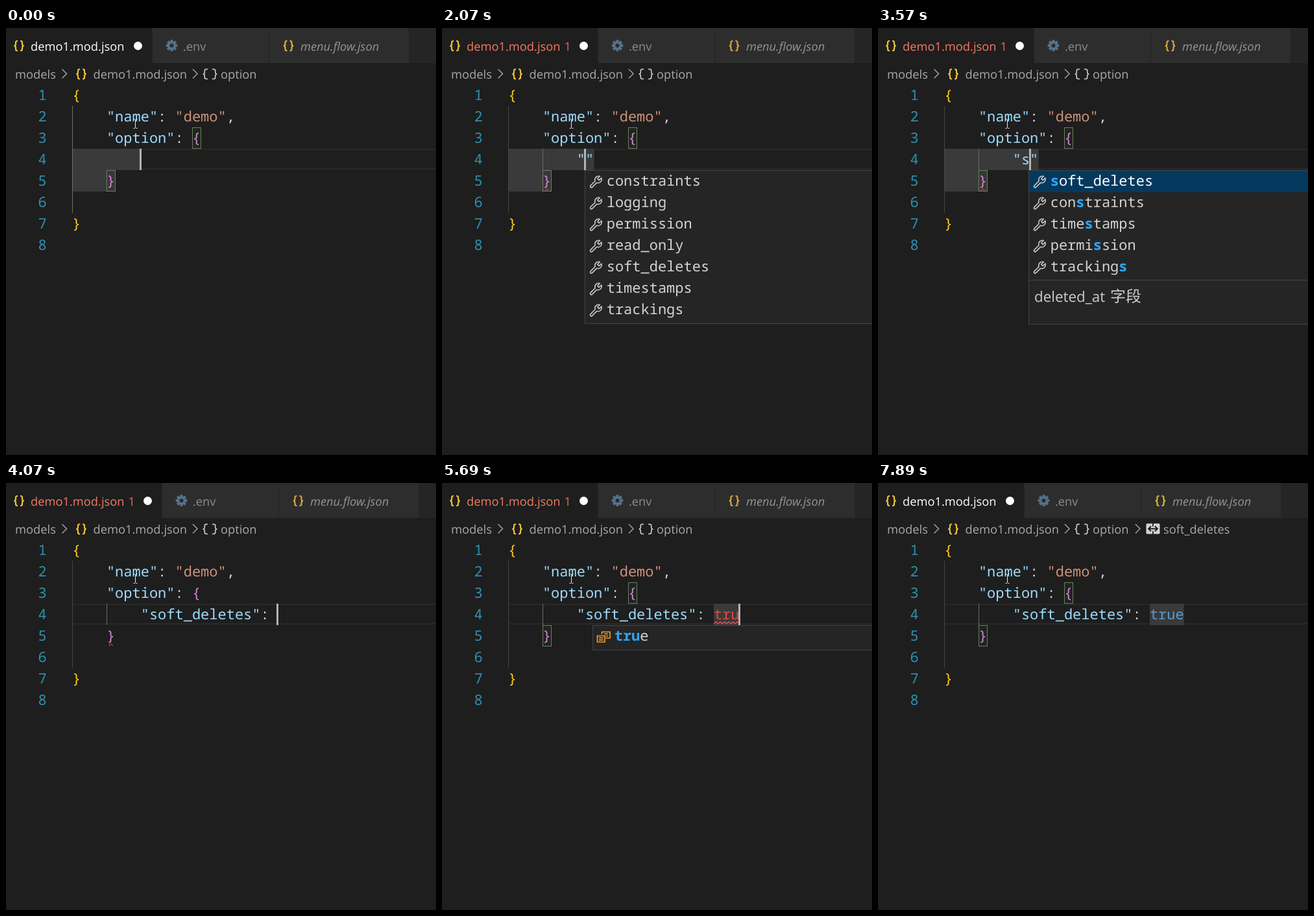
Write an HTML page that moves like this. It is 663 px wide and 658 px high and loops after 8000 ms.

```html
<!DOCTYPE html>
<html lang="en">
<head>
<meta charset="utf-8">
<title>Editor completion</title>
<style>
html, body { margin: 0; width: 100%; height: 100%; overflow: hidden; background: #1e1e1e; }
svg { display: block; width: 663px; height: 658px; }
text { white-space: pre; text-rendering: geometricPrecision; }
.code { font: 500 22px "Noto Sans Mono", monospace; }
.ui { font: 18.3px "Open Sans", "Noto Sans", sans-serif; }
.preview { font: italic 18.3px "Open Sans", "Noto Sans", sans-serif; }
.doc { font: 22.4px "Open Sans", "Noto Sans", sans-serif; }
.cjk { font: 24px "Noto Sans CJK SC", "Noto Sans CJK", sans-serif; }
</style>
</head>
<body>
<svg id="stage" viewBox="0 0 663 658"></svg>
<script>
const LOOP = 8000, CHAR = 13.2, LINE = 33;
const KEY = '#9cdcfe', STR = '#ce9178', PLAIN = '#d4d4d4', GOLD = '#ffcb12', PINK = '#da80d6';
const BLINKS = [570, 1070, 1570, 2070, 3070, 3570, 4670, 5090, 6090, 6390, 6890, 7390, 7890];
const WORDS = ['constraints', 'logging', 'permission', 'read_only', 'soft_deletes', 'timestamps', 'trackings'];
const S_WORDS = ['soft_deletes', 'constraints', 'timestamps', 'permission', 'trackings'];

const colX = c => 102.6 + CHAR * c;
const lineY = n => 87 + LINE * (n - 1);
const baseY = n => lineY(n) + 24.2;

const rect = (x, y, w, h, fill, extra = '') =>
  `<rect x="${x}" y="${y}" width="${w}" height="${h}" fill="${fill}" ${extra}/>`;
const path = (d, color, width = 1, extra = '') =>
  `<path d="${d}" fill="none" stroke="${color}" stroke-width="${width}" ${extra}/>`;
const text = (x, y, s, fill, cls = 'ui') =>
  `<text x="${x}" y="${y}" class="${cls}" fill="${fill}">${s}</text>`;
const at = (x, y, body) => `<g transform="translate(${x} ${y})">${body}</g>`;
const code = (col, line, s, fill) => text(colX(col) - .5, baseY(line), s, fill, 'code');

function braces(x, y, color, width = 2.2, gap = 0, arm = 0) {
  const d = `M${arm - 2}-7.5h${-.5 - arm}q-2.5 0-2.5 2.5v2q0 3-2.7 3q2.7 0 2.7 3v2q0 2.5 2.5 2.5h${.5 + arm}`;
  const half = path(d, color, width);
  return at(x - gap, y, half) + at(x + gap, y, `<g transform="scale(-1 1)">${half}</g>`);
}

function gear(x, y) {
  let teeth = '';
  for (let i = 0; i < 8; i++) teeth += rect(-2, -8.8, 4, 4, '#57728a', `transform="rotate(${i * 45})"`);
  return at(x, y, teeth + '<circle r="4.9" fill="none" stroke="#57728a" stroke-width="3.6"/>');
}

const chevron = x => path(`M${x} 63.5l7 7-7 7`, '#a0a0a0', 1.5);

const wrench = (x, y) => at(x, y, path(
  'M2 12.2L7.2 7C6.2 4 8.5.9 12.4 1.8L9.8 4.5 11.5 6.2 14.2 3.6C15.2 7.5 12 9.8 9 8.8L3.8 14A1.3 1.3 0 0 1 2 12.2Z',
  '#c5c5c5', 1.15, 'transform="scale(1.4)" stroke-linejoin="round"'));

const enumIcon = (x, y) => at(x, y, path(
  'M8.5 4.5V1H21V10.5H14.5M12 4H18M14.5 7.5H18M1.5 7H13V16.5H1.5ZM4 10.2H10.5M4 13.4H10.5', '#ee9d28', 1.7));

const boolIcon = rect(413.5, 62.5, 21, 16, '#d4d4d4', 'rx="1.5"') +
  path('M417 70.5H431M421 66.5L417 70.5 421 74.5M427 66.5L431 70.5 427 74.5M424 62V67M424 74V79', '#1e1e1e', 1.8);

function squiggle(x, w, y, color = '#f14c4c') {
  let d = `M${x} ${y}`;
  for (let i = 0; i < Math.round(w / 3.3); i++) d += `l3.3 ${i % 2 ? 3 : -3}`;
  return path(d, color, 1.4);
}

function tabs(error) {
  const dx = error ? 15 : 0, y = 35;
  let s = rect(0, 0, 663, 54, '#252526') + rect(0, 0, 225 + dx, 54, '#1e1e1e');
  s += rect(226 + dx, 0, 179, 54, '#2d2d2d') + rect(406 + dx, 0, 215, 54, '#2d2d2d');
  s += braces(20, 27.5, '#efc336') + text(38, y, 'demo1.mod.json', error ? '#f47a64' : '#fff');
  if (error) s += text(188.5, y, '1', '#dd6d58');
  s += `<circle cx="${203.5 + dx}" cy="27.5" r="6.5" fill="#fff"/>`;
  s += gear(255.5 + dx, 27) + text(273 + dx, y, '.env', '#8c8c8c');
  s += braces(435.5 + dx, 27.5, error ? '#d5a544' : '#d9b43a');
  return s + text(454 + dx, y, 'menu.flow.json', '#949494', 'preview');
}

function crumbs(deep) {
  const y = 78, gray = '#a9a9a9';
  let s = text(14, y, 'models', gray) + chevron(86.5);
  s += braces(116, 71, '#efc336') + text(134.5, y, 'demo1.mod.json', gray) + chevron(288);
  s += braces(314.5, 71, '#cfcfcf', 1.6, 3.2, 1.8) + text(331, y, 'option', gray);
  if (deep) s += chevron(397) + boolIcon + text(440, y, 'soft_deletes', gray);
  return s;
}

// Marks the first match of the typed part in bold blue.
const label = (word, typed) =>
  typed ? word.replace(typed, `<tspan fill="#2ba5f7" font-weight="700">${typed}</tspan>`) : word;

function popup(x, words, { typed = '', icon = wrench, selected = false, doc = '' } = {}) {
  const h = doc ? 237 : 5 + LINE * words.length;
  let s = rect(x, 219.5, 500, h, '#252526', 'stroke="#454545"');
  if (selected) s += rect(x + .5, 220, 500, LINE, '#04395e');
  words.forEach((w, i) => {
    const y = 220 + LINE * i;
    s += icon(x + 5.5, y + (icon === wrench ? 6 : 8.5));
    s += text(x + 33.2, y + 23.4, label(w, typed), selected && !i ? '#fff' : PLAIN, 'code');
  });
  if (doc) s += path(`M${x} 388.5H663`, '#454545') + doc;
  return s;
}

function suggestions(t) {
  if (t < 170) return '';
  if (t < 2570) return popup(220.5, WORDS);
  if (t < 4070) {
    const selected = t >= 3570;
    const doc = selected
      ? text(241, 422, 'deleted_at', '#ccc', 'doc') + text(358, 422, '字段', '#ccc', 'cjk') : '';
    return popup(232.5, S_WORDS, { typed: 's', selected, doc });
  }
  if (t < 4170 || t >= 7790) return '';
  if (t < 5290) return popup(232.5, ['false', 'true'], { icon: enumIcon });
  return popup(232.5, ['true'], { typed: typedValue(t), icon: enumIcon });
}

const typedValue = t => 'true'.slice(0, [5290, 5490, 5590, 6390].filter(k => t >= k).length);

function editor(t) {
  const value = typedValue(t), keyDone = t >= 4070, y = lineY(4);
  const draft = t < 70 ? '' : t < 2570 ? '""' : '"s"';
  const end = keyDone ? 24 + value.length : 8 + Math.max(0, draft.length - 1);
  let s = '';

  // Highlights, current line and indent guides
  s += path('M103 187H663M103 217H663', '#292929', 2);
  if (!keyDone) {
    s += rect(103, y, colX(8 + draft.length) - 103, LINE, '#3a3a3a');
    s += rect(103, y + LINE, 52, LINE, '#3a3a3a');
  } else if (value) {
    s += rect(419, y, CHAR * value.length, LINE, '#3a3a3a');
  } else if (t >= 4170) {
    s += rect(419.5, y, 2, LINE, '#474747');
  }
  s += path('M102.5 120V285', t < 70 ? '#707070' : '#454545');
  if (t >= 70) s += path('M155.5 186V219', '#666c62');
  if (t < 4070 || t >= 4170) {
    const box = 'stroke="#68805f"';
    s += rect(287.5, 153.5, 13, 32, '#1e261e', box) + rect(155.5, 219.5, 13, 32, keyDone ? '#1e261e' : '#343a34', box);
  }

  // Code
  for (let n = 1; n <= 8; n++) s += text(49.5, baseY(n), n, '#2b91af', 'code');
  s += code(0, 1, '{', GOLD) + code(0, 7, '}', GOLD);
  s += code(4, 2, '"name"', KEY) + code(10, 2, ':', PLAIN) + code(12, 2, '"demo"', STR) + code(18, 2, ',', PLAIN);
  s += code(4, 3, '"option"', KEY) + code(12, 3, ':', PLAIN) + code(14, 3, '{', PINK) + code(4, 5, '}', PINK);
  if (keyDone) {
    s += code(8, 4, '"soft_deletes"', KEY) + code(22, 4, ':', PLAIN);
    s += code(24, 4, value, value === 'true' ? '#569cd6' : '#e04848');
  } else {
    s += code(8, 4, draft, KEY);
  }

  // Problems and caret
  if (t >= 170 && t < 5290) s += squiggle(158.5, 6.6, 251, '#a04444');
  if (t >= 5290 && t < 6590) s += squiggle(419, t < 5690 ? 13 : 39, 217);
  if (BLINKS.filter(b => t >= b).length % 2 === 0) s += rect(Math.round(colX(end) - 2), y, 3, LINE, '#b4b5b3');
  return s;
}

const pointer = path('M196.5 140.5h2l1 1 1-1h2M199.5 141V154M196.5 154.5h2l1-1 1 1h2', '#e8e8e8');

const stage = document.getElementById('stage');
let start, shown;

function draw(t) {
  const s = tabs(t >= 170 && t < 6590) + crumbs(t >= 6790) + editor(t) + suggestions(t) + pointer;
  if (s !== shown) stage.innerHTML = shown = s;
}

function tick(now) {
  start ??= now;
  draw((now - start) % LOOP);
  requestAnimationFrame(tick);
}

draw(0);
requestAnimationFrame(tick);
</script>
</body>
</html>
```
